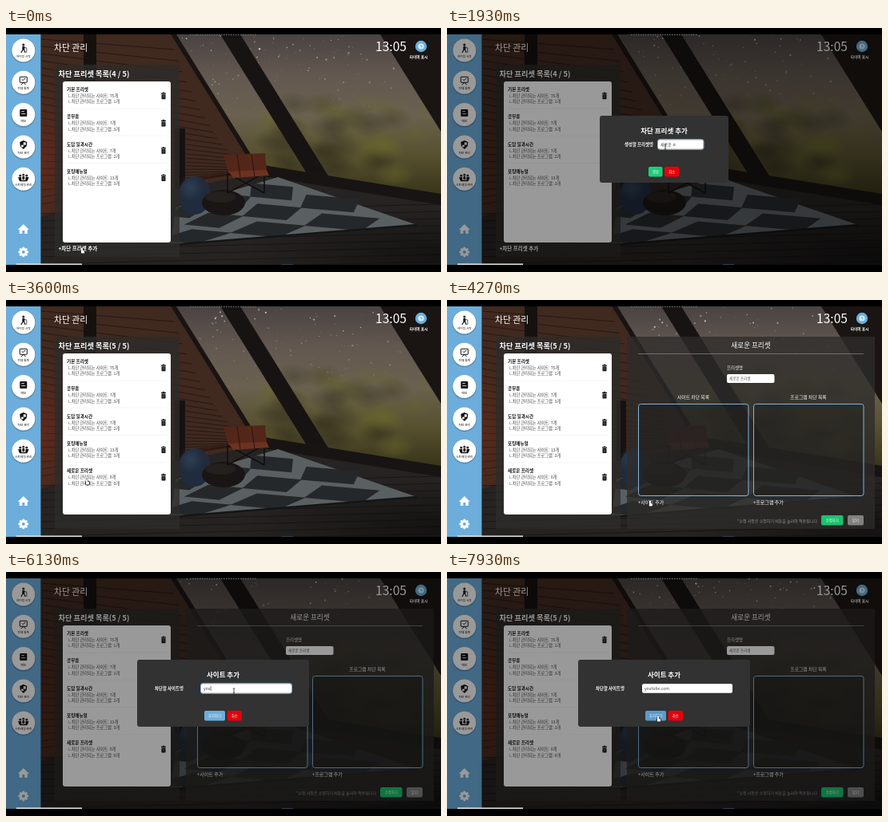
These frames come from a looping animation (544x306 px, 8000 ms). An HTML page with a canvas:

```html
<!DOCTYPE html>
<html lang="ko">
<head>
<meta charset="utf-8">
<style>
html, body { margin: 0; width: 100%; height: 100%; overflow: hidden; background: #000; }
canvas { display: block; width: 544px; height: 306px; }
</style>
</head>
<body>
<canvas id="stage" width="544" height="306"></canvas>
<script>
const ctx = document.getElementById('stage').getContext('2d');
const LOOP = 8000, TOP = 8, RIGHT = 544, BOTTOM = 297, SIDEBAR = 43.5;
const FONT = '"Noto Sans CJK KR", "Noto Sans CJK", "Noto Sans", sans-serif';
const BLUE = '#6caddb', RED = '#e60008', GREEN = '#1dce78', INK = '#111', PANEL = 'rgba(46,44,43,.78)';

const mix = (a, b, k) => a + (b - a) * k;
const smooth = k => k * k * (3 - 2 * k);
const clamp = (v, low, high) => Math.max(low, Math.min(high, v));
const random = n => { const v = Math.sin(n * 127.1 + 31.7) * 43758.5453; return v - Math.floor(v); };

function trace(points) {
  ctx.beginPath();
  for (let i = 0; i < points.length; i += 2) ctx.lineTo(points[i], points[i + 1]);
}
function poly(color, ...points) {
  trace(points);
  ctx.fillStyle = color;
  ctx.fill();
}
function line(color, width, ...points) {
  trace(points);
  ctx.strokeStyle = color;
  ctx.lineWidth = width;
  ctx.stroke();
}
function box(x, y, w, h, color, radius = 0, border) {
  ctx.beginPath();
  ctx.roundRect(x, y, w, h, radius);
  if (color) { ctx.fillStyle = color; ctx.fill(); }
  if (border) { ctx.strokeStyle = border; ctx.lineWidth = 1; ctx.stroke(); }
}
function oval(x, y, rx, ry, color) {
  ctx.fillStyle = color;
  ctx.beginPath();
  ctx.ellipse(x, y, rx, ry, 0, 0, 7);
  ctx.fill();
}
const dot = (x, y, r, color) => oval(x, y, r, r, color);
function glow(x, y, rx, ry, rgb, alpha) {
  ctx.save();
  ctx.translate(x, y);
  ctx.scale(rx, ry);
  const shade = ctx.createRadialGradient(0, 0, 0, 0, 0, 1);
  shade.addColorStop(0, `rgba(${rgb},${alpha})`);
  shade.addColorStop(1, `rgba(${rgb},0)`);
  ctx.fillStyle = shade;
  ctx.fillRect(-1, -1, 2, 2);
  ctx.restore();
}
// y is the vertical middle of the line of text
function text(str, x, y, size, color = '#fff', weight = 400, align = 'left') {
  ctx.font = `${weight} ${size}px ${FONT}`;
  ctx.fillStyle = color;
  ctx.textAlign = align;
  ctx.fillText(str, x, y + size * 0.38);
}
function button(label, x, y, w, color, labelColor = '#fff') {
  box(x, y, w, 12.4, color, 2);
  text(label, x + w / 2, y + 6.2, 4.4, labelColor, 400, 'center');
}

// Every window bar leans by the same slope.
const leanX = (x, y) => x + (y - TOP) * 0.62;
const leaning = (color, x, w, y = 200) => poly(color, x, TOP, x + w, TOP, leanX(x + w, y), y, leanX(x, y), y);

function drawWindow(t) {
  const sky = ctx.createLinearGradient(0, TOP, 0, 210);
  ['#4a4342', '#625850', '#6b6150', '#57502f', '#37341a'].forEach((c, i) => sky.addColorStop(i / 4, c));
  box(200, TOP, RIGHT - 200, 215, sky);
  for (let i = 0; i < 50; i++) {
    const x = mix(320, RIGHT, random(i)), y = mix(95, 195, random(i + 60));
    glow(x, y, 26, 16, i % 2 ? '105,103,42' : '42,39,24', 0.32);
  }
  for (let i = 0; i < 150; i++) {
    const x = mix(210, 500, random(i)) + Math.sin(t / 900 + i) * 3;
    const fall = (random(i + 200) + t / 9000 * (0.5 + random(i + 400))) % 1;
    dot(x, TOP + fall * 105, mix(0.35, 1.2, random(i + 600) ** 2), `rgba(235,232,230,${(1 - fall) * mix(0.4, 1, random(i + 800))})`);
  }
}

function drawWall(t) {
  poly('#40291f', SIDEBAR, TOP, 206, TOP, leanX(206, 182), 182, 325, 190, SIDEBAR, 238);
  for (let y = 14; y < 225; y += 9) {
    const end = Math.min(312, leanX(206, y));
    line('#271811', 1, SIDEBAR, y, end, mix(y + 9, 175, (y - TOP) / 230));
  }
  glow(46, 165, 40, 100, '150,45,20', 0.2 + 0.15 * Math.sin(t / 570 + 1.5));
  box(97, TOP, 16, 215, '#15110f');
}

function drawFloor() {
  poly('#262322', SIDEBAR, 236, 325, 180, RIGHT, 218, RIGHT, BOTTOM, SIDEBAR, BOTTOM);
  for (let y = 225; y < 340; y += 9) line('#191716', 1.2, SIDEBAR, y + 8, RIGHT, y - 4);
  glow(RIGHT, 285, 260, 60, '8,7,7', 0.6);
}

// u runs along the rug from left to right, v from back to front
const rugPoint = (u, v) => [mix(mix(212, 340, u), mix(206, 514, u), v), mix(mix(225, 187, u), mix(272, 247, u), v)];
function drawRug() {
  const patch = (color, u, v, du, dv) =>
    poly(color, ...rugPoint(u - du, v), ...rugPoint(u, v - dv), ...rugPoint(u + du, v), ...rugPoint(u, v + dv));
  poly('#5a5f62', ...rugPoint(0, 0), ...rugPoint(1, 0), ...rugPoint(1, 1), ...rugPoint(0, 1));
  for (let row = 0; row < 3; row++) {
    for (let col = 0; col < 3; col++) patch('#25282a', (col + 0.3 + row % 2 * 0.4) / 3, (row + 0.5) / 3, 0.17, 0.19);
  }
  line('#141516', 2.5, ...rugPoint(0, 1), ...rugPoint(1, 1));
}

function drawFurniture() {
  box(211, 126, 13, 76, '#171211');
  oval(236, 210, 20, 24, '#202c3d');
  glow(231, 200, 16, 17, '60,80,108', 0.5);
  oval(272, 219, 27, 16, '#191514');
  oval(268, 212, 19, 7, '#25201d');
  for (const x of [277, 323]) line('#120f0e', 1.6, x, 182, 600 - x, 207);
  line('#120f0e', 1.6, 277, 182, 277, 207);
  line('#120f0e', 1.6, 323, 182, 323, 207);
  poly('#542619', 272, 159, 324, 157, 326, 179, 278, 181);
  poly('#6b321f', 278, 180, 326, 178, 329, 185, 284, 188);
  for (let x = 289; x < 325; x += 18) line('#2b140e', 1, x, 158, x + 4, 187);
}

function drawRoom(t) {
  drawWindow(t);
  drawWall(t);
  leaning('#191412', 206, 7, 182);
  leaning('#171312', 268, 25);
  poly('#1a1513', 468, TOP, RIGHT, TOP, RIGHT, 130);
  drawFloor();
  poly('#171413', 322, 172, RIGHT, 208, RIGHT, 222, 322, 186);
  drawRug();
  drawFurniture();
}

function person(x, y, size) {
  dot(x, y, size, INK);
  box(x - size, y + size * 1.3, size * 2, size * 2.8, INK, size / 2);
}
const menu = [
  ['하이킹 시작', (x, y) => {
    person(x, y - 7, 1.5);
    line(INK, 1.2, x - 3, y + 3, x, y - 2, x + 2.5, y + 3);
    line(INK, 0.7, x, y - 4, x + 4, y - 3, x + 4, y + 3);
  }],
  ['전체 통계', (x, y) => {
    box(x - 4.5, y - 7, 9, 7, null, 0.5, INK);
    line(INK, 1, x - 2, y - 4, x - 0.5, y - 2.5, x + 2.5, y - 5.5);
    line(INK, 1, x - 3, y + 3, x, y, x + 3, y + 3);
  }],
  ['메모', (x, y) => {
    box(x - 4.5, y - 6.5, 9, 9, INK, 1);
    for (const dy of [-4, -1]) line('#fff', 0.8, x - 2.5, y + dy, x + 2.5 + dy / 2 + 0.5, y + dy);
  }],
  ['차단 관리', (x, y) => {
    poly(INK, x, y - 8, x + 4.5, y - 6, x + 4, y - 1, x, y + 3, x - 4, y - 1, x - 4.5, y - 6);
    box(x, y - 5.5, 3, 3.3, '#fff');
    box(x - 2.7, y - 2.2, 2.7, 2.5, '#fff');
  }],
  ['스트레칭 관리', (x, y) => {
    for (const dx of [-4, 0, 4]) person(x + dx, y - 5 + Math.abs(dx) / 4, 1.4);
    line(INK, 1.6, x - 6, y - 2, x - 4, y + 2.3, x + 4, y + 2.3, x + 6, y - 2);
  }]
];
function drawSidebar() {
  const x = 21.8;
  box(0, TOP, SIDEBAR, BOTTOM - TOP, BLUE);
  menu.forEach(([label, icon], i) => {
    const y = 28 + i * 40.3;
    dot(x, y + 0.8, 15.2, 'rgba(40,70,100,.35)');
    dot(x, y, 14.5, '#fff');
    icon(x, y);
    text(label, x, y + 7.5, 3.7, INK, 500, 'center');
  });
  poly('#fff', x, 246, x + 7, 253, x - 7, 253);
  box(x - 5, 252, 10, 6, '#fff');
  box(x - 1.5, 254, 3, 4, BLUE);
  for (let a = 0; a < 6.2; a += Math.PI / 4) line('#fff', 2.6, x, 281, x + Math.cos(a) * 6.3, 281 + Math.sin(a) * 6.3);
  dot(x, 281, 4.9, '#fff');
  dot(x, 281, 2, BLUE);
}

function drawHeader() {
  text('차단 관리', 60, 24.5, 10.8, '#fff', 500);
  text('13:05', 501, 23.5, 15.6, '#fff', 400, 'right');
  dot(519, 23, 7.2, '#69b0df');
  dot(519, 23, 3.6, '#d9eefb');
  line('#4a86b0', 0.8, 519, 21, 519, 23.4, 520.6, 23.4);
  text('타이머 표시', 516, 36.5, 4.7, '#fff', 700, 'center');
}

const NEW_NAME = '새로운 프리셋';
const presets = [
  ['기본 프리셋', 75, 1], ['공부용', 7, 3], ['도담 일과시간', 7, 2], ['포팅매뉴얼', 13, 3], [NEW_NAME, 0, 0]
];
function drawTrash(x, y) {
  box(x - 3, y - 3.5, 6, 1.2, INK);
  box(x - 1.2, y - 4.4, 2.4, 1.2, INK);
  box(x - 2.5, y - 1.8, 5, 6, INK, 0.6);
  for (const dx of [-0.8, 0.8]) line('#999', 0.5, x + dx, y - 0.8, x + dx, y + 3);
}
function drawList(count) {
  box(61, 46, 156, 241, PANEL);
  text(`차단 프리셋 목록(${count} / 5)`, 65.5, 57.2, 9.2, '#fff', 700);
  box(71, 67, 135, 202, '#fff', 3);
  presets.slice(0, count).forEach(([name, sites, programs], i) => {
    const y = 77 + i * 34.3;
    text(name, 76, y, 5.6, INK, 700);
    text(`ㄴ차단 관리되는 사이트: ${sites}개`, 77, y + 8, 5.2, '#444');
    text(`ㄴ차단 관리되는 프로그램: ${programs}개`, 77, y + 15.5, 5.2, '#444');
    drawTrash(197, y + 8);
    if (i < count - 1) line('#eee', 0.6, 76, y + 24, 201, y + 24);
  });
  if (count < 5) text('+차단 프리셋 추가', 65.5, 276.5, 6.5, '#fff', 700);
}

function drawDetails() {
  box(225, 46, 310, 241, PANEL);
  text(NEW_NAME, 380, 57.2, 8.6, '#fff', 500, 'center');
  line('#8a8a8a', 0.7, 239, 67.5, 521, 67.5);
  text('프리셋명', 350, 84.5, 5.4, '#fff', 500);
  box(350, 93, 59.5, 11, '#fff', 2);
  text(NEW_NAME, 353, 98.5, 4.6, '#555');
  ['사이트', '프로그램'].forEach((kind, i) => {
    const x = 239 + i * 144;
    text(`${kind} 차단 목록`, x + 69, 121.5, 5.8, '#fff', 500, 'center');
    box(x + 0.5, 130.5, 137.5, 115, 'rgba(20,20,20,.3)', 3, '#7fb6df');
    text(`+${kind} 추가`, x, 253.5, 6, '#fff', 500);
  });
  text('*수정 사항은 수정하기 버튼을 눌러야 적용됩니다', 463, 277, 5, '#929292', 400, 'right');
  button('수정하기', 468, 270, 27.5, '#1bc26d');
  button('닫기', 501, 270, 20, '#818181');
}

// The modal is centred; its buttons and input are placed from there.
function drawModal(t, { width, title, label, labelX, hint, inputX, inputW, value, focused, action, actionX, actionW, color, off }) {
  const middle = 271.5;
  box(0, TOP, RIGHT, BOTTOM - TOP, 'rgba(0,0,0,.4)');
  box(middle - width / 2, 110, width, 84, '#323232', 3);
  text(title, middle, 128.7, 8.5, '#fff', 700, 'center');
  text(label, labelX, 146, 5.4, '#fff', 700);
  if (focused) box(inputX - 0.5, 139.7, inputW + 1, 12.6, null, 2.5, '#79b4e8');
  box(inputX, 140.2, inputW, 11.6, '#fff', 2);
  text(value || hint, inputX + 3, 146, 5, value ? '#444' : '#888');
  if (focused && t % 1000 < 500) {
    const caret = inputX + 3.5 + (value ? ctx.measureText(value).width : 0);
    line('#222', 0.6, caret, 143, caret, 149);
  }
  if (!value) text(`${label}을 입력해주세요.`, middle, 160, 5.3, '#b00d12', 400, 'center');
  button(action, actionX, 174, actionW, value ? color : off, value ? '#fff' : '#aaa');
  button('취소', actionX + actionW + 2.5, 174, 18.5, RED);
}

// Keystrokes of Hangul text: initial, then vowel, then final consonant.
function hangulSteps(word) {
  const initials = 'ㄱㄲㄴㄷㄸㄹㅁㅂㅃㅅㅆㅇㅈㅉㅊㅋㅌㅍㅎ';
  const steps = [''];
  [...word].forEach((char, i) => {
    const before = word.slice(0, i), code = char.charCodeAt(0) - 0xac00;
    if (code >= 0) {
      steps.push(before + initials[Math.floor(code / 588)]);
      if (code % 28) steps.push(before + String.fromCharCode(0xac00 + code - code % 28));
    }
    steps.push(before + char);
  });
  return steps;
}
const nameSteps = hangulSteps(NEW_NAME);
const site = 'youtube.com';
const typed = (t, start, gap, count) => clamp(Math.floor((t - start) / gap) + 1, 0, count);

const MOVE = 450;
const start = { x: 95, y: 277 };
const moves = [
  { at: 300, x: 273, y: 149 },
  { at: 2580, x: 264, y: 181 },
  { at: 3110, x: 101, y: 226 },
  { at: 3830, x: 254, y: 253 },
  { at: 4380, x: 285, y: 149 },
  { at: 7400, x: 264, y: 182 }
];
function pointerAt(t) {
  return moves.reduce((from, to) => {
    const k = smooth(clamp((t - to.at) / MOVE, 0, 1));
    return { x: mix(from.x, to.x, k), y: mix(from.y, to.y, k) };
  }, start);
}
function drawPointer(t, inModal) {
  const { x, y } = pointerAt(t);
  ctx.save();
  ctx.translate(x, y);
  if (inModal && y > 140 && y < 152 && x > 244) {
    line('#222', 0.8, 0, -3, 0, 3);
    for (const end of [-3, 3]) line('#222', 0.7, -1.2, end, 1.2, end);
  } else if (!inModal || y > 174) {
    box(-0.8, -1.5, 1.8, 5, '#fff', 0.8, '#222');
    box(-1.5, 1.5, 5, 4.5, '#fff', 1.2, '#222');
    box(-0.8, -1.5, 1.8, 5, '#fff', 0.8);
  } else {
    poly('#fff', 0, 0, 0, 5.5, 1.5, 4.2, 4, 3.7);
  }
  ctx.restore();
}

function render(now) {
  const t = now % LOOP;
  const created = t >= 3080, presetModal = t >= 350 && !created, siteModal = t >= 4380;
  box(0, 0, RIGHT, 306, '#000');
  ctx.save();
  ctx.beginPath();
  ctx.rect(0, TOP, RIGHT, BOTTOM - TOP);
  ctx.clip();
  drawRoom(t);
  drawHeader();
  drawList(created ? 5 : 4);
  if (t >= 3760) drawDetails();
  drawSidebar();
  if (presetModal) {
    drawModal(t, {
      width: 161, title: '차단 프리셋 추가', label: '생성할 프리셋명', labelX: 222, hint: '프리셋명', inputX: 264, inputW: 56.5,
      value: nameSteps[typed(t, 1250, 80, nameSteps.length - 1)], focused: t > 850,
      action: '생성', actionX: 252, actionW: 17.5, color: GREEN, off: '#2b8058'
    });
  }
  if (siteModal) {
    drawModal(t, {
      width: 215, title: '사이트 추가', label: '차단할 사이트명', labelX: 186, hint: '차단할 사이트명', inputX: 244, inputW: 113,
      value: site.slice(0, typed(t, 5800, 130, site.length)), focused: t > 5100 && t < 7800,
      action: '추가하기', actionX: 248, actionW: 26, color: t > 7750 ? '#5a9bcc' : BLUE, off: '#48708e'
    });
  }
  drawPointer(t, presetModal || siteModal);
  ctx.restore();
  for (let x = 230; x < 312; x += 3) box(x, TOP, 1.6, 1, '#777');
  box(13, 295.6, 82, 1.4, '#e8e8e8');
  box(345, 296, 14, 1, '#31404c');
  requestAnimationFrame(render);
}
requestAnimationFrame(render);
</script>
</body>
</html>
```
